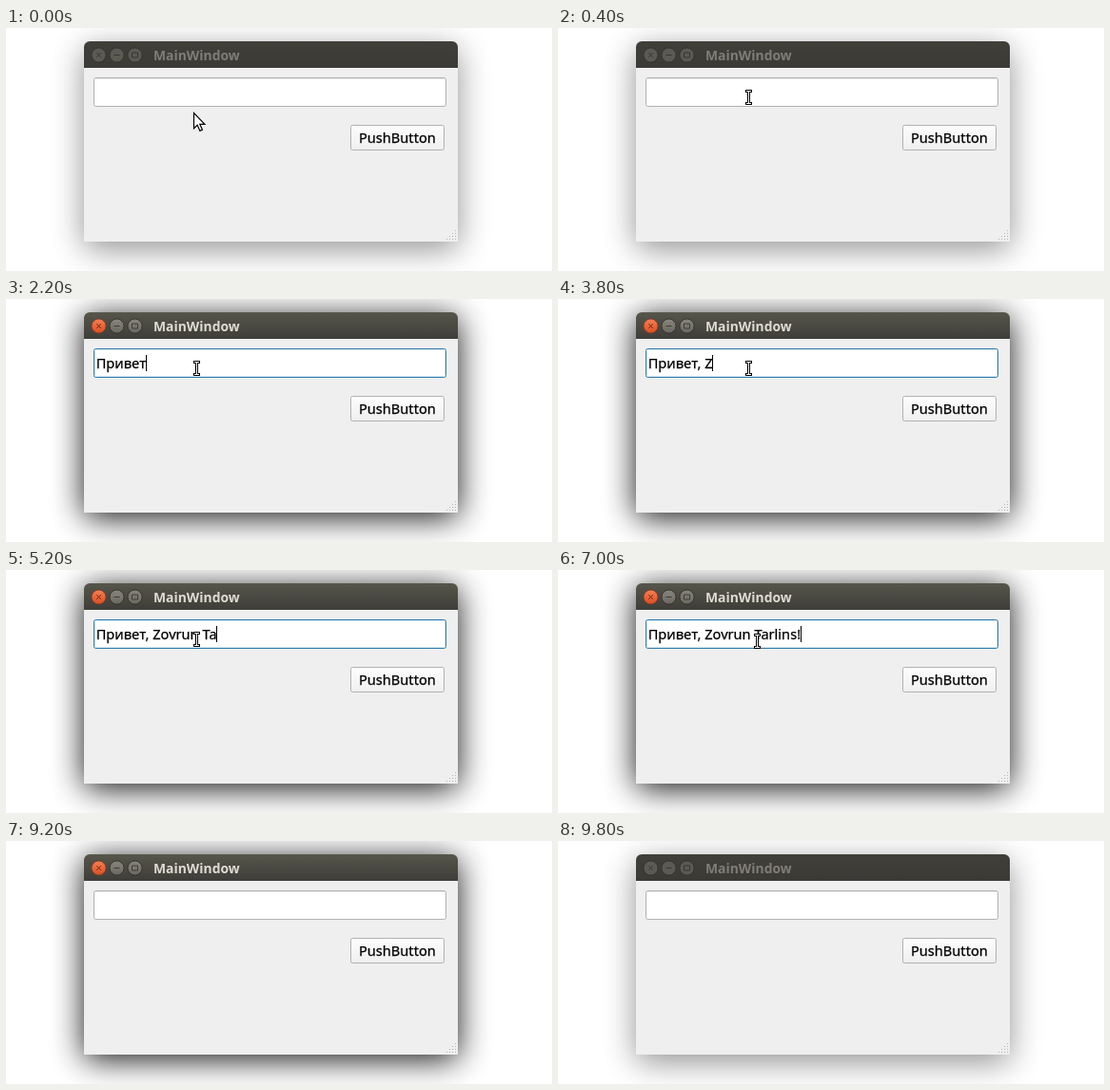
Write an HTML page that moves like this. It is 574x256 px and loops after 10000 ms.

```html
<!DOCTYPE html>
<html lang="en">
<head>
<meta charset="utf-8">
<title>MainWindow</title>
<style>
  html, body { margin: 0; width: 574px; height: 256px; overflow: hidden; background: #fff; }
  svg { display: block; }
  text { font-family: "Noto Sans", "Open Sans", sans-serif; font-size: 14.6px; white-space: pre; }
  .label { stroke: #000; stroke-width: .25px; }
  #title { font-size: 13.9px; font-weight: 700; }
</style>
</head>
<body>
<svg width="574" height="256" viewBox="0 0 574 256">
  <defs>
    <linearGradient id="barActive" x2="0" y2="1">
      <stop stop-color="#57564b"/><stop offset="1" stop-color="#3e3d39"/>
    </linearGradient>
    <linearGradient id="barIdle" x2="0" y2="1">
      <stop stop-color="#403f3a"/><stop offset="1" stop-color="#3b3a36"/>
    </linearGradient>
    <linearGradient id="closeFill" x2="0" y2="1">
      <stop stop-color="#f58056"/><stop offset="1" stop-color="#dc4d20"/>
    </linearGradient>
    <linearGradient id="knobFill" x2="0" y2="1">
      <stop stop-color="#88867c"/><stop offset="1" stop-color="#69675f"/>
    </linearGradient>
    <linearGradient id="btnNormal" x2="0" y2="1">
      <stop stop-color="#fdfdfd"/><stop offset="1" stop-color="#efefef"/>
    </linearGradient>
    <linearGradient id="btnHover" x2="0" y2="1">
      <stop stop-color="#fff"/><stop offset="1" stop-color="#f8f8f8"/>
    </linearGradient>
    <filter id="blur" filterUnits="userSpaceOnUse" x="-20" y="-60" width="620" height="380"
            color-interpolation-filters="sRGB">
      <feGaussianBlur stdDeviation="17"/>
    </filter>
  </defs>

  <rect id="shadow" x="82" width="393" height="211" rx="6" filter="url(#blur)"/>
  <path d="M82 42V20a6 6 0 0 1 6-6H469a6 6 0 0 1 6 6V42Z" id="bar"/>
  <path d="M82 42H475V225H82Z" fill="#efefef"/>

  <g id="knobs" stroke-width="1"></g>
  <text id="title" x="155" y="34">MainWindow</text>

  <rect id="field" x="92.5" y="52.5" width="370" height="30" rx="2" fill="#fff"/>
  <rect id="fieldGlow" x="93.5" y="53.5" width="368" height="28" rx="1.5" fill="none" stroke="#dfeef7"/>
  <path id="fieldShade" d="M94 53.5H461" stroke="#e6e6e6"/>
  <text id="typed" class="label" x="94.7" y="73"></text>
  <rect id="caret" y="59" width="1" height="17"/>

  <rect id="button" x="362.5" y="102.5" width="98" height="26" rx="2" stroke="#b1b1b1"/>
  <text class="label" x="371" y="121">PushButton</text>

  <g id="grip" fill="#b4b4b4"></g>

  <path id="arrow" d="M.5.5V16.8L4.2 13.3 6.9 19.4 9.4 18.3 6.8 12.3H11.9Z" fill="#fff" stroke="#000" stroke-width="1.2"/>
  <g id="beam" fill="none" stroke-linecap="square">
    <path d="M-2-6.5H2M-2 6.5H2M0-6.5V6.5" stroke="#000" stroke-width="3"/>
    <path d="M-2-6.5H2M-2 6.5H2M0-6.5V6.5" stroke="#fff"/>
  </g>
</svg>
<script>
const LOOP = 10000, STEP = 100;
const MESSAGE = "Привет, Zovrun Tarlins!";
const $ = id => document.getElementById(id);
const set = (id, attrs) => { for (const k in attrs) $(id).setAttribute(k, attrs[k]); };
const show = (id, on) => set(id, { visibility: on ? "visible" : "hidden" });

// Time at which each character appears.
const KEY_TIMES = [1400, 1500, 1700, 1900, 2000, 2200, 3000, 3200, 3800, 4100, 4200, 4200,
  4400, 4600, 4800, 5000, 5200, 5400, 5600, 5800, 5900, 6000, 6500];

const GLYPHS = ["M-2.2-2.2 2.2 2.2M2.2-2.2-2.2 2.2", "M-3 0H3", "M-3-2.5H3V2.5H-3Z"];
$("knobs").innerHTML = GLYPHS.map((d, i) =>
  `<g transform="translate(${97.5 + 19 * i} 28.5)"><circle r="7.6"/><path d="${d}" fill="none"/></g>`).join("");

for (let row = 0; row < 4; row++)
  for (let col = 3 - row; col < 4; col++)
    $("grip").innerHTML += `<rect x="${463 + 3 * col}" y="${213 + 3 * row}" width="1" height="1"/>`;

function drawChrome(active) {
  set("shadow", active ? { y: 19, opacity: 0.92 } : { y: 22, opacity: 0.43 });
  set("bar", { fill: `url(#${active ? "barActive" : "barIdle"})` });
  set("title", { fill: active ? "#dfdbd2" : "#807d78" });
  [...$("knobs").children].forEach((knob, i) => {
    const [disc, glyph] = knob.children;
    const fill = i ? "url(#knobFill)" : "url(#closeFill)";
    disc.setAttribute("fill", active ? fill : "#5b5a53");
    disc.setAttribute("stroke", active ? (i ? "#33322e" : "#7a3c26") : "#35342f");
    glyph.setAttribute("stroke", active ? (i ? "#3c3b37" : "#5c2413") : "#35342f");
  });
}

function drawField(t) {
  const focused = t >= 600 && t < 8400;
  const count = t < 8500 ? KEY_TIMES.filter(k => k <= t).length : 0;
  const typed = $("typed");
  typed.textContent = MESSAGE.slice(0, count);
  const width = count ? typed.getComputedTextLength() : 0;
  set("caret", { x: Math.floor(95 + width) });
  show("caret", focused && !(t >= 7300 && t < 7900));
  set("field", { stroke: focused ? "#2f78aa" : "#b1b1b1" });
  show("fieldGlow", focused);
  show("fieldShade", !focused);
}

function drawButton(t) {
  const pressed = t >= 8400 && t < 8500;
  const hover = t >= 7500 && t < 9100;
  set("button", { fill: pressed ? "#dcdcdc" : `url(#${hover ? "btnHover" : "btnNormal"})` });
}

// Pointer hotspot, or null while it is outside the recorded area.
function pointerAt(t) {
  if (t < 200) return [197, 89];
  if (t < 300) return [198, 86];
  if (t < 400) return [199, 76];
  if (t < 7000) return [200, 73];
  if (t < 9100) {
    const p = Math.min(1, (t - 6900) / 800), e = p * p * (3 - 2 * p);
    return [Math.round(200 + 209 * e), Math.round(73 + 41 * e)];
  }
  return t < 9200 ? [282, 46] : null;
}

function drawPointer(t) {
  const pos = pointerAt(t);
  const overField = pos && pos[1] > 52 && pos[1] < 83;
  show("arrow", pos && !overField);
  show("beam", overField);
  if (!pos) return;
  set("arrow", { transform: `translate(${pos})` });
  set("beam", { transform: `translate(${pos[0] + 0.5} ${pos[1]})` });
}

function draw(time) {
  const t = Math.floor((time % LOOP) / STEP) * STEP;
  drawChrome(t >= 600 && t < 9800);
  drawField(t);
  drawButton(t);
  drawPointer(t);
}

const start = performance.now();
function tick() {
  draw(performance.now() - start);
  requestAnimationFrame(tick);
}
tick();
</script>
</body>
</html>
```
